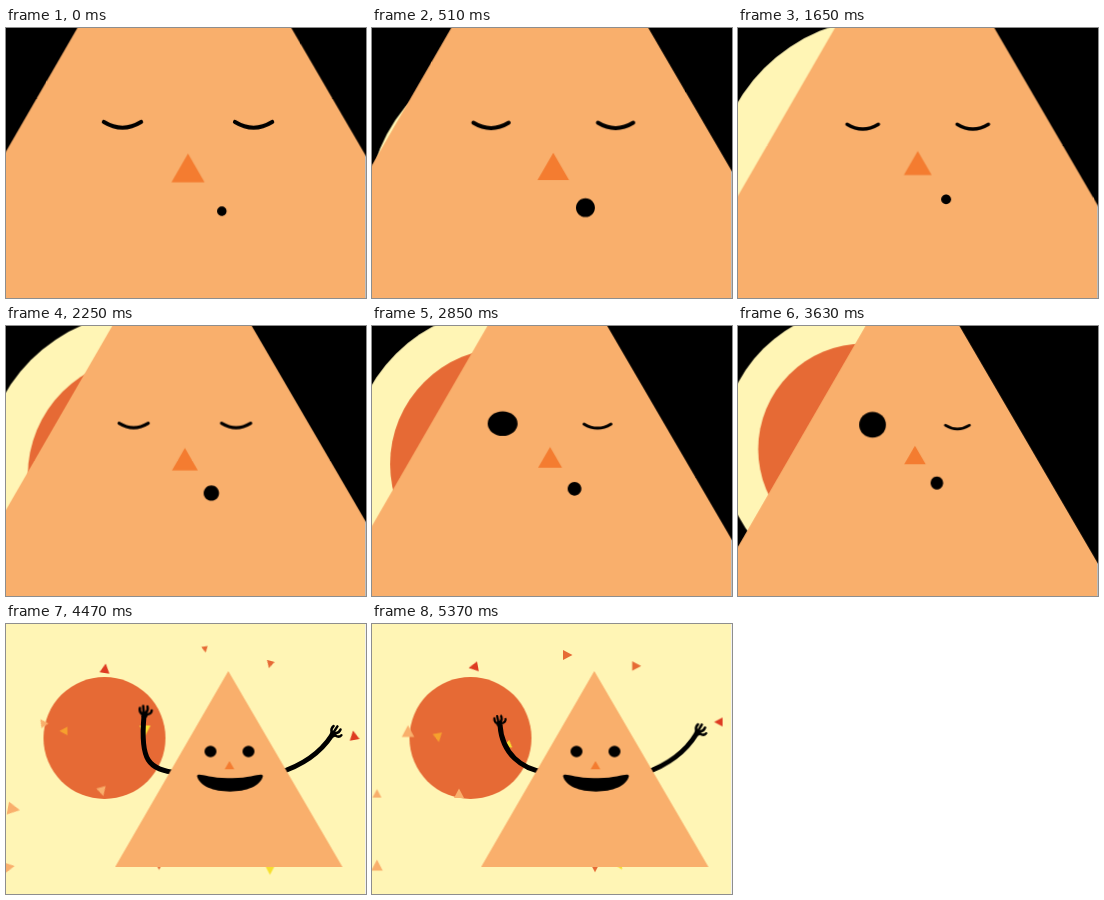
Recreate the animation shown at these times as an HTML page without scripts. Size 360 by 270 pixels, loop 5400 ms.

```html
<!DOCTYPE html>
<html lang="en">
<head>
<meta charset="utf-8">
<title>Sleepy triangle</title>
<style>
html, body { margin: 0; width: 100%; height: 100%; overflow: hidden; background: #000; }
svg { display: block; width: 100vw; height: 100vh; }
svg * { animation: 5.4s linear infinite; }

.sky { fill: #fff5b5; animation-name: sky; }
.sun { fill: #e66a35; animation-name: sun; }
.orbit { animation-name: orbit; }
@keyframes orbit {
  0% { transform: translate(165px, 193px); }
  68.33% { transform: translate(125px, 122px); animation-timing-function: cubic-bezier(.4, 0, .3, 1); }
  74.44%, 100% { transform: translate(98.5px, 114px); }
}
@keyframes sky {
  0% { r: 100px; animation-timing-function: ease-out; }
  14% { r: 175px; }
  18.33% { r: 174.5px; }
  30.56% { r: 171.2px; }
  52.78% { r: 156px; }
  68.33% { r: 141px; animation-timing-function: ease-in-out; }
  74%, 100% { r: 340px; }
}
@keyframes sun {
  0%, 30% { r: 0; animation-timing-function: ease-out; }
  42% { r: 119px; }
  52.78% { r: 116px; }
  68.33% { r: 104.7px; animation-timing-function: cubic-bezier(.4, 0, .3, 1); }
  74.44%, 100% { r: 61px; }
}

/* zoom around the nose tip */
.camera { animation-name: camera; }
@keyframes camera {
  0% { transform: translate(182px, 126px) scale(3.45); }
  68.33% { transform: translate(176.9px, 119.9px) scale(2.214); animation-timing-function: cubic-bezier(.4, 0, .3, 1); }
  74.44%, 100% { transform: translate(223.5px, 137px) scale(1); }
}

.body { fill: #f9af6c; }
.nose { fill: #f47c30; }
.lid, .arm, .hand { fill: none; stroke: #000; stroke-linecap: round; }
.lid { stroke-width: 1.2; }
.left .lid { animation-name: lid-left; }
.left .eye { animation-name: eye-left; }
.right .lid { animation-name: lid-right; }
.right .eye { animation-name: eye-right; }
@keyframes lid-left { 0%, 50.5% { opacity: 1; } 50.51%, 100% { opacity: 0; } }
@keyframes eye-left { 0%, 50.5% { transform: scale(1, 0); } 53.2%, 100% { transform: none; } }
@keyframes lid-right { 0%, 68.9% { opacity: 1; } 68.91%, 100% { opacity: 0; } }
@keyframes eye-right { 0%, 68.9% { transform: scale(1, 0); } 71%, 100% { transform: none; } }

.mouth { transform-origin: 9.8px 16.6px; animation-name: breathe, smile; }
@keyframes breathe {
  0% { transform: scale(.49); animation-timing-function: ease-in-out; }
  8% { transform: scale(1.03); }
  19% { transform: scale(1.02); animation-timing-function: ease-in-out; }
  27% { transform: scale(.53); }
  30.56% { transform: scale(.61); animation-timing-function: ease-in-out; }
  38% { transform: scale(1.03); }
  52.78% { transform: scale(.98); }
  67%, 100% { transform: scale(1, 1.04); }
}
@keyframes smile {
  0%, 68.9% {
    d: path("M7 16.6C7 15.05 8.25 13.8 9.8 13.8C11.35 13.8 12.6 15.05 12.6 16.6C12.6 18.15 11.35 19.4 9.8 19.4C8.25 19.4 7 18.15 7 16.6Z");
    animation-timing-function: ease-out;
  }
  73.5%, 100% {
    d: path("M-32.5 15C-31 11 -22 17.5 .5 17C23 17.5 32 11 33.5 15C31 25 17 30 .5 30C-16 30 -30 25 -32.5 15Z");
  }
}

.arm { stroke-width: 5; stroke-linecap: butt; }
.hand { stroke-width: 2.5; }
.reach { animation-name: reach; }
.reach.l { transform-origin: 172px 148px; }
.reach.r { transform-origin: 274px 148px; }
@keyframes reach {
  0%, 73.5% { transform: scale(0); animation-timing-function: cubic-bezier(.2, .9, .4, 1.2); }
  78%, 100% { transform: scale(1); }
}
.l .arm, .l .hand, .sway { animation: .6s -.33s ease-in-out infinite; }
.l .arm { animation-name: bend; }
.l .hand { animation-name: wave; }
.sway { animation-name: sway; transform-origin: 280px 147px; }
@keyframes bend {
  0%, 100% { d: path("M172 149C142 146 134 136 138 92"); }
  50% { d: path("M172 148C150 145 130 130 128 101"); }
}
@keyframes wave {
  0%, 100% { transform: translate(138.5px, 92.5px); }
  50% { transform: translate(127.7px, 101.5px) rotate(-8deg) scale(.92); }
}
@keyframes sway { 50% { transform: rotate(-2deg); } }

.bit { animation-name: burst; }
@keyframes burst {
  0%, 73.5% {
    transform: translate(222px, 140px) rotate(0deg) scale(0);
    animation-timing-function: cubic-bezier(.1, .7, .3, 1);
  }
  82.78% { transform: translate(var(--a)) rotate(var(--p)) scale(var(--s)); }
  99.44%, 100% { transform: translate(var(--b)) rotate(var(--q)) scale(var(--t)); }
}
.red { fill: #de3b22; }
.rust { fill: #e66a35; }
.peach { fill: #f9af6c; }
.amber { fill: #f6a02d; }
.lemon { fill: #f6df2f; }

/* colourless strip along the right side */
.edge { fill: #888; mix-blend-mode: saturation; }
</style>
</head>
<body>
<svg viewBox="0 0 360 270" preserveAspectRatio="none">
  <defs>
    <path id="bit" d="M0-5.5L5 4H-5Z"/>
    <g id="palm">
      <path d="M-2.5-2.5Q-5.5-5-4.6-8.5M-.8-4L-1.3-10.5M1.5-4Q4-6.5 3-10M2.5-2Q7-2.5 7.2-6"/>
      <circle cy="-1.8" r="3.2" fill="#000" stroke="none"/>
    </g>
  </defs>
  <rect width="360" height="270"/>
  <g class="orbit">
    <circle class="sky"/>
    <circle class="sun"/>
  </g>

  <use href="#bit" class="bit red" style="--a:99px,45px;--b:102px,43px;--p:8deg;--q:-100deg;--s:1;--t:1"/>
  <use href="#bit" class="bit rust" style="--a:199px,25px;--b:195px,31px;--p:170deg;--q:90deg;--s:.65;--t:1"/>
  <use href="#bit" class="bit rust" style="--a:264px,40px;--b:264px,42px;--p:195deg;--q:90deg;--s:.8;--t:.95"/>
  <use href="#bit" class="bit red" style="--a:348px,112px;--b:347px,98px;--p:-10deg;--q:-90deg;--s:1;--t:.9"/>
  <use href="#bit" class="bit peach" style="--a:37px,99px;--b:36px,108px;--p:-35deg;--q:0deg;--s:.85;--t:1.25"/>
  <use href="#bit" class="bit amber" style="--a:58px,107px;--b:66px,113px;--p:-90deg;--q:-190deg;--s:.85;--t:.95"/>
  <use href="#bit" class="bit lemon" style="--a:139px,106px;--b:137px,121px;--p:180deg;--q:130deg;--s:1.1;--t:.8"/>
  <use href="#bit" class="bit peach" style="--a:96px,167px;--b:87px,170px;--p:165deg;--q:0deg;--s:.95;--t:1"/>
  <use href="#bit" class="bit peach" style="--a:7px,185px;--b:5px,170px;--p:100deg;--q:0deg;--s:1.3;--t:.9"/>
  <use href="#bit" class="bit peach" style="--a:3px,243px;--b:5px,242px;--p:80deg;--q:0deg;--s:1.05;--t:1.15"/>
  <use href="#bit" class="bit rust" style="--a:153px,242px;--b:223px,244px;--p:180deg;--q:180deg;--s:.7;--t:.8"/>
  <use href="#bit" class="bit lemon" style="--a:264px,246px;--b:248px,242px;--p:180deg;--q:150deg;--s:.9;--t:.8"/>

  <g class="camera">
    <g transform="translate(-223.5 -137)">
      <g class="reach l">
        <path class="arm" d="M172 149C142 146 134 136 138 92"/>
        <use href="#palm" class="hand"/>
      </g>
      <g class="reach r">
        <g class="sway">
          <path class="arm" d="M272 149C298 141 315 128 326 111"/>
          <use href="#palm" class="hand" transform="translate(326 111.5) rotate(38)"/>
        </g>
      </g>
    </g>
    <path class="body" d="M-1.2-90L113 106H-114.4Z"/>
    <path class="nose" d="M0-.1L4.8 8.2H-4.8Z"/>
    <g class="left" transform="translate(-19 -9.5)">
      <path class="lid" d="M-5.4 .2Q0 3.5 5.4 .2"/>
      <ellipse class="eye" rx="6" ry="5.8"/>
    </g>
    <g class="right" transform="translate(19 -9.5)">
      <path class="lid" d="M-5.4 .2Q0 3.5 5.4 .2"/>
      <ellipse class="eye" rx="6" ry="5.8"/>
    </g>
    <path class="mouth" d="M7 16.6C7 15.05 8.25 13.8 9.8 13.8C11.35 13.8 12.6 15.05 12.6 16.6C12.6 18.15 11.35 19.4 9.8 19.4C8.25 19.4 7 18.15 7 16.6Z"/>
  </g>
  <rect class="edge" x="359" width="1" height="270"/>
</svg>
</body>
</html>
```
